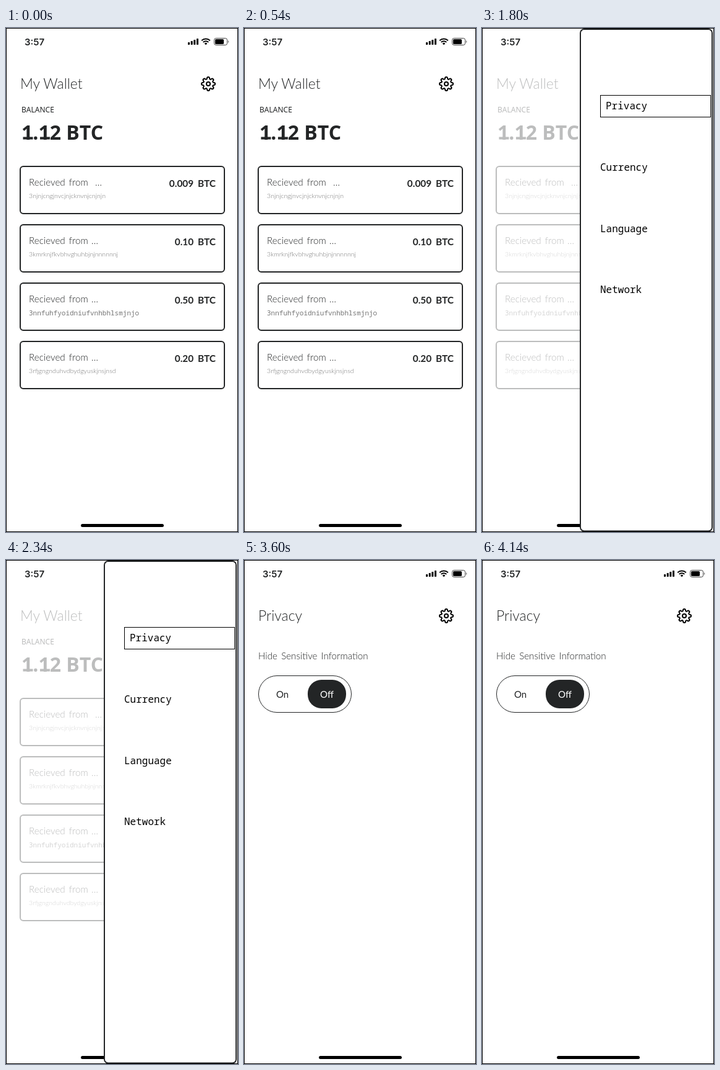
Animation, 375 px wide and 812 px high, one loop 4500 ms. Source, as an HTML page:

```html
<!DOCTYPE html>
<html lang="en">
<head>
<meta charset="utf-8">
<title>Wallet privacy</title>
<style>
  html, body { margin: 0; width: 100%; height: 100%; overflow: hidden; background: #fff; }
  svg { display: block; width: 375px; height: 812px; }
  text { fill: #232526; white-space: pre; }
  .hand { font-family: Lato, sans-serif; font-weight: 300; }
  .title { font-size: 23px; }
  .line { font-size: 15.2px; word-spacing: 2px; }
  .addr { font-size: 10.6px; fill: #777; }
  .amount { font: 700 15.4px Lato, sans-serif; word-spacing: 3px; text-anchor: end; }
  .option { font: 400 15px Lato, sans-serif; }
  .mono { font-family: "Noto Sans Mono", monospace; }
  .menu { font-size: 16px; fill: #000; }
  .box { fill: none; stroke: #232526; stroke-width: 2; }
  .thin { fill: none; stroke: #232526; }
  .light { fill: #fff; }

  .wallet, .drawer, .plain, .picked, .privacy, .on, .off {
    animation: 4.5s step-end infinite;
  }
  .wallet { animation-name: wallet; }
  .drawer { animation-name: drawer; }
  .plain { animation-name: plain; }
  .picked { animation-name: picked; }
  .privacy { animation-name: privacy; }
  .on { animation-name: on; }
  .off { animation-name: off; }
  @keyframes wallet { 0% { opacity: 1 } 20% { opacity: .3 } 60%, 100% { opacity: 0 } }
  @keyframes drawer { 0% { opacity: 0 } 20% { opacity: 1 } 60%, 100% { opacity: 0 } }
  @keyframes plain { 0% { opacity: 1 } 40%, 100% { opacity: 0 } }
  @keyframes picked { 0% { opacity: 0 } 40%, 100% { opacity: 1 } }
  @keyframes privacy { 0% { opacity: 0 } 60%, 100% { opacity: 1 } }
  @keyframes on { 0% { opacity: 1 } 80%, 100% { opacity: 0 } }
  @keyframes off { 0% { opacity: 0 } 80%, 100% { opacity: 1 } }
</style>
</head>
<body>
<svg viewBox="0 0 375 812">
  <defs>
    <rect id="card" class="box" x="23" y="223" width="330" height="76" rx="5"/>
    <path id="tooth" d="M19.4 15a1.65 1.65 0 0 0 .33 1.82l.06.06a2 2 0 0 1-2.83 2.83l-.06-.06a1.65 1.65 0 0 0-1.82-.33 1.65 1.65 0 0 0-1 1.51V21a2 2 0 0 1-4 0v-.09A1.65 1.65 0 0 0 9 19.4"/>
  </defs>

  <rect width="375" height="812" fill="#fff"/>

  <!-- status bar -->
  <text x="30" y="28" font-family="Inter, sans-serif" font-weight="600" font-size="15">3:57</text>
  <g>
    <rect x="294" y="23" width="3" height="4" rx=".7"/>
    <rect x="298.7" y="21" width="3" height="6" rx=".7"/>
    <rect x="303.3" y="19" width="3" height="8" rx=".7"/>
    <rect x="308" y="17" width="3" height="10" rx=".7"/>
    <g fill="none" stroke="#000" stroke-width="2">
      <path d="M316.2 20.2a9.8 9.8 0 0 1 13.6 0"/>
      <path d="M318.7 22.9a6.2 6.2 0 0 1 8.6 0"/>
    </g>
    <path d="M323 27.2l-2.3-2.3a3.3 3.3 0 0 1 4.6 0z"/>
    <rect x="336.5" y="16.5" width="21" height="11" rx="3" fill="none" stroke="#000" stroke-opacity=".75"/>
    <rect x="338" y="18" width="14" height="8" rx="1.5"/>
    <path d="M359 20v4a2.2 2.2 0 0 0 0-4z" fill-opacity=".6"/>
  </g>

  <g transform="translate(315 78)" fill="none" stroke="#000" stroke-width="2" stroke-linecap="round">
    <circle cx="12" cy="12" r="3"/>
    <use href="#tooth"/>
    <use href="#tooth" transform="rotate(90 12 12)"/>
    <use href="#tooth" transform="rotate(180 12 12)"/>
    <use href="#tooth" transform="rotate(270 12 12)"/>
  </g>

  <rect x="121" y="799" width="134" height="5" rx="2.5"/>

  <g class="wallet">
    <text class="hand title" x="23" y="98">My Wallet</text>
    <text x="25" y="136" font-family="Noto Sans, sans-serif" font-weight="500" font-size="12">BALANCE</text>
    <text x="25" y="179.5" font-family="Noto Sans, sans-serif" font-weight="700" font-size="32">1.12 BTC</text>
    <path d="M27.5 175.5h16v4h-16zm27.5 0h16v4h-16z" fill="#232526"/>

    <use href="#card"/>
    <text class="hand line" x="37" y="254">Recieved from<tspan x="144">…</tspan></text>
    <text class="hand addr" x="37" y="274">3njnjcngjnvcjnjcknvnjcnjnjn</text>
    <text class="amount" x="339" y="256">0.009 BTC</text>

    <g transform="translate(0 94)">
      <use href="#card"/>
      <text class="hand line" x="37" y="254">Recieved from<tspan x="138">…</tspan></text>
      <text class="hand addr" x="37" y="274">3kmrknjfkvbhvghuhbjnjnnnnnnj</text>
      <text class="amount" x="339" y="256">0.10 BTC</text>
    </g>
    <g transform="translate(0 188)">
      <use href="#card"/>
      <text class="hand line" x="37" y="254">Recieved from<tspan x="138">…</tspan></text>
      <text class="mono addr" x="37" y="275" style="font-size:11px">3nnfuhfyoidniufvnhbhlsmjnjo</text>
      <text class="amount" x="339" y="256">0.50 BTC</text>
    </g>
    <g transform="translate(0 282)">
      <use href="#card"/>
      <text class="hand line" x="37" y="254">Recieved from<tspan x="138">…</tspan></text>
      <text class="hand addr" x="37" y="274">3rfjgngnduhvdbydgyuskjnsjnsd</text>
      <text class="amount" x="339" y="256">0.20 BTC</text>
    </g>
  </g>

  <g class="drawer">
    <rect class="box" x="159" y="2" width="213" height="808.5" rx="6" style="fill:#fff"/>
    <text class="mono menu plain" x="191" y="131">Privacy</text>
    <g class="picked">
      <rect x="191.5" y="108.5" width="178" height="35" fill="none" stroke="#000"/>
      <text class="mono menu" x="200" y="131">Privacy</text>
    </g>
    <text class="mono menu" x="191" y="230">Currency</text>
    <text class="mono menu" x="191" y="328.5">Language</text>
    <text class="mono menu" x="191" y="427">Network</text>
  </g>

  <g class="privacy">
    <text class="hand title" x="23" y="98">Privacy</text>
    <text class="hand line" x="23" y="160">Hide Sensitive Information</text>
    <rect class="thin" x="23.5" y="186.5" width="150" height="59" rx="29.5"/>
    <g class="on">
      <rect x="32" y="193" width="61" height="46" rx="22" fill="#232526"/>
      <text class="option light" x="52" y="222">On</text>
      <text class="option" x="123" y="222">Off</text>
    </g>
    <g class="off">
      <rect x="103" y="193" width="62" height="46" rx="22" fill="#232526"/>
      <text class="option" x="52" y="222">On</text>
      <text class="option light" x="123" y="222">Off</text>
    </g>
  </g>

  <rect x=".5" y=".5" width="374" height="811" fill="none" stroke="#000"/>
</svg>
</body>
</html>
```
